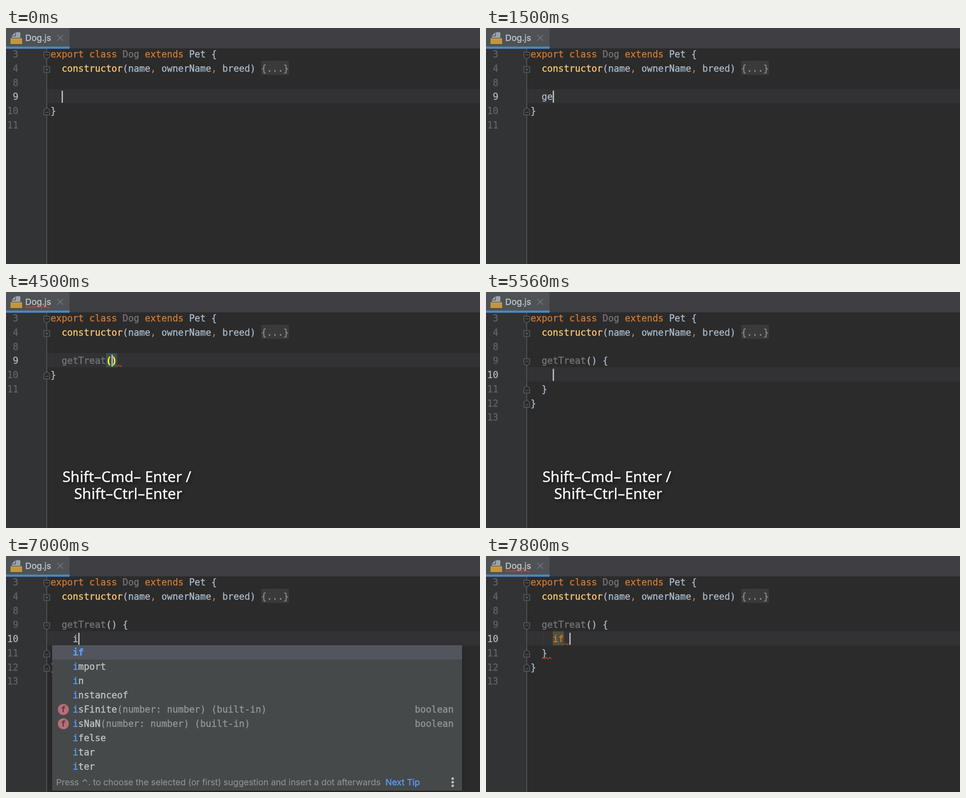
An HTML page with a canvas for the animation above (8 s loop, 1058x529 px).

```html
<!DOCTYPE html>
<html lang="en">
<head>
<meta charset="utf-8">
<title>Code editor</title>
<style>
  html, body { margin: 0; width: 100%; height: 100%; overflow: hidden; background: #2b2b2b; }
  canvas { display: block; }
</style>
</head>
<body>
<canvas id="stage" width="1058" height="529"></canvas>
<script>
const ctx = document.getElementById('stage').getContext('2d');
const W = 1058, H = 529, LOOP = 8000;
const LEFT = 99.5, PITCH = 12.37, LINE = 31.75;
const MONO = '20.55px "DejaVu Sans Mono", monospace';
const UI = '19.25px Inter, sans-serif';
const C = {
  text: '#a9b7c6', key: '#cc7832', fn: '#ffc66d', dim: '#737577', back: '#2b2b2b',
  gutter: '#313335', line: '#323234', rule: '#606264', error: '#c7423e', link: '#589df6'
};

const colX = col => LEFT + col * PITCH;
const baseY = row => 66.2 + row * LINE;
const topY = row => 41.75 + row * LINE;

function rect(x, y, w, h, color) {
  ctx.fillStyle = color;
  ctx.fillRect(x, y, w, h);
}

// A thin outline gives the letters a slightly heavier stem.
function text(str, x, y, color, font = MONO, align = 'left', outline = 0.45) {
  ctx.font = font;
  ctx.textAlign = align;
  ctx.fillStyle = ctx.strokeStyle = color;
  ctx.lineWidth = outline;
  ctx.fillText(str, x, y);
  ctx.strokeText(str, x, y);
}

function path(points, close) {
  ctx.beginPath();
  points.forEach(([x, y]) => ctx.lineTo(x, y));
  if (close) ctx.closePath();
}

function stroke(points, color, width, close) {
  path(points, close);
  ctx.strokeStyle = color;
  ctx.lineWidth = width;
  ctx.stroke();
}

function dot(x, y, r, color) {
  ctx.beginPath();
  ctx.arc(x, y, r, 0, Math.PI * 2);
  ctx.fillStyle = color;
  ctx.fill();
}

// Parts alternate text and color, laid out on the character grid.
function runs(x, y, ...parts) {
  for (let i = 0; i < parts.length; i += 2) {
    text(parts[i], x, y, parts[i + 1]);
    x += parts[i].length * PITCH;
  }
}

const code = (row, col, ...parts) => runs(colX(col), baseY(row), ...parts);

function mark(row, col, count, color) {
  rect(colX(col), topY(row), count * PITCH, LINE, color);
}

function squiggle(x1, x2, y) {
  const points = [];
  for (let x = x1, up = false; x <= x2; x += 3.7, up = !up) points.push([x, y + (up ? -2 : 2)]);
  stroke(points, C.error, 1.3);
}

function errorAt(row, col, width) {
  squiggle(colX(col), colX(col) + width, baseY(row) + 4);
}

function caret(row, col) {
  rect(colX(col), baseY(row) - 21, 2.7, 27, '#c8c8c8');
}

function fold(row, kind) {
  const l = 84.5, r = 97.5, m = 91, y = topY(row);
  const shapes = {
    open: [[l, y + 12.5], [r, y + 12.5], [r, y + 23], [m, y + 28.5], [l, y + 23]],
    end: [[l, y + 26], [r, y + 26], [r, y + 15.5], [m, y + 9.5], [l, y + 15.5]],
    plus: [[l, y + 13], [r, y + 13], [r, y + 26], [l, y + 26]]
  };
  const mid = y + (kind === 'open' ? 18.5 : kind === 'end' ? 20.5 : 19.5);
  path(shapes[kind], true);
  ctx.fillStyle = C.back;
  ctx.fill();
  stroke(shapes[kind], C.rule, 1.4, true);
  stroke([[87.5, mid], [94.5, mid]], C.rule, 1.4);
  if (kind === 'plus') stroke([[m, mid - 3.5], [m, mid + 3.5]], C.rule, 1.4);
}

function tab(hasError) {
  rect(0, 0, W, 45.5, '#3f3f43');
  rect(0, 0, 142, 41.5, '#4e5254');
  rect(0, 41.5, 142, 5, '#4a88c7');
  path([[13, 17], [20.5, 9.5], [20.5, 17]], true);
  ctx.fillStyle = '#9aa4ab';
  ctx.fill();
  path([[22, 9.5], [32, 9.5], [32, 22], [13, 22], [13, 18.5], [22, 18.5]], true);
  ctx.fill();
  rect(10, 23, 26, 13, '#c0973f');
  text('Dog.js', 43, 29, '#c3c5c7', UI);
  stroke([[114.5, 15.5], [127.5, 28.5]], '#797d80', 1.5);
  stroke([[127.5, 15.5], [114.5, 28.5]], '#797d80', 1.5);
  if (hasError) squiggle(43, 101.5, 34);
}

// Each item is [icon, right-hand type, ...colored parts].
function popup(x, y, w, textX, items) {
  const row = 32, h = items.length * row + 38;
  ctx.save();
  ctx.shadowColor = 'rgba(0,0,0,.22)';
  ctx.shadowBlur = 12;
  ctx.shadowOffsetY = 5;
  rect(x, y, w, h, '#46494a');
  ctx.restore();
  rect(x, y, w, row, '#52555d');
  items.forEach(([icon, type, ...parts], i) => {
    const base = y + i * row + 23;
    if (icon) {
      dot(x + 25, base - 7, 12.2, '#b76e78');
      text('f', x + 25, base - 1, '#44343a', '18px "DejaVu Sans Mono", monospace', 'center');
    }
    if (parts.length === 2 && i === 0) {
      text(parts[0], textX, base, parts[1], 'bold ' + MONO);
    } else {
      runs(textX, base, ...parts);
    }
    if (type) text(type, x + w - 19, base, '#939596', MONO, 'right');
  });
  const base = y + h - 12;
  text('Press ⌃. to choose the selected (or first) suggestion and insert a dot afterwards',
    x + 9, base, '#8f9193', UI, 'left', 0.2);
  text('Next Tip', x + 744, base, C.link, UI);
  [-8, 0, 8].forEach(d => dot(x + w - 21, y + h - 19 + d, 2.8, '#bfc1c2'));
}

function callItem(first, rest, args, type) {
  return [true, type, first, C.link, rest, '#c0c2c4', args, '#939596'];
}

const ifItem = [false, '', 'if', C.link];
const finiteItem = [true, 'boolean', 'i', C.link, 's', '#c0c2c4', 'F', C.link, 'inite', '#c0c2c4',
  '(number: number) (built-in)', '#939596'];

function caption() {
  const font = '33px "Noto Sans", sans-serif';
  ctx.save();
  ctx.shadowColor = 'rgba(0,0,0,.4)';
  ctx.shadowBlur = 6;
  ctx.shadowOffsetX = ctx.shadowOffsetY = 3;
  text('Shift–Cmd– Enter /', 126, 426, '#fff', font);
  text('Shift–Ctrl–Enter', 152, 464, '#fff', font);
  ctx.restore();
}

function bulb() {
  dot(123.5, 119, 8, '#edb34c');
  rect(119.5, 125, 8, 3, '#edb34c');
  rect(119.5, 129.5, 8, 2, '#9aa4ab');
  rect(121, 133, 5, 1.5, '#9aa4ab');
}

// Start time of each typed length of the method name.
const keys = [[1330, 'g'], [1500, 'ge'], [1630, 'get'], [2000, 'getT'], [2300, 'getTr'],
  [2400, 'getTre'], [2560, 'getTrea'], [2830, 'getTreat']];

const typedAt = t => keys.reduce((word, [start, next]) => t >= start ? next : word, '');
const between = (t, a, b) => t >= a && t < b;

function methodLine(t) {
  const word = typedAt(t);
  const parens = t >= 3730;
  const dimCount = t < 2100 ? 0 : t < 2500 ? 3 : t < 3200 ? 6 : 8;
  if (between(t, 3230, 4030)) mark(3, 2, 8, '#344134');
  const fresh = word === 'get' ? C.key : C.text;
  code(3, 2, word.slice(0, dimCount), C.dim, word.slice(dimCount), fresh);
  if (parens) {
    mark(3, 10, 2, '#3b514d');
    text('(', colX(10), baseY(3), '#ffef28', 'bold ' + MONO);
    text(')', colX(11), baseY(3), '#ffef28', 'bold ' + MONO);
    if (t >= 4100) errorAt(3, 12, 11.5);
  }
  if (!between(t, 800, 1300) && t < 4800) caret(3, 2 + word.length + parens);
  if (between(t, 1430, 1470)) {
    popup(88, 169, 943, colX(2), [
      [false, '', 'get', C.link],
      [false, '', 'g', C.link, 'et name() {...}', '#c0c2c4']
    ]);
  }
}

function methodBlock(t) {
  code(3, 2, 'getTreat', C.dim, '() {', C.text);
  code(5, 2, '}', C.text);
  if (t < 5530) errorAt(3, 14, 11.5);
  if (t >= 7760) {
    mark(4, 4, 2, '#52503a');
    rect(128, topY(4), 1, LINE, '#3b3b3b');
    errorAt(4, 6, 12.5);
    errorAt(5, 2, 23);
  }
  const word = t < 6860 ? '' : t < 7030 ? 'i' : t < 7430 ? 'if' : 'if ';
  code(4, 4, word, word.length > 1 ? C.key : C.text);
  if (!between(t, 6330, 6830)) caret(4, 4 + word.length);
}

function suggestions(t) {
  if (between(t, 7000, 7030)) {
    popup(103, 200, 915, colX(4), [
      ifItem,
      [false, '', 'i', C.link, 'mport', '#c0c2c4'],
      [false, '', 'i', C.link, 'n', '#c0c2c4'],
      [false, '', 'i', C.link, 'nstanceof', '#c0c2c4'],
      callItem('i', 'sFinite', '(number: number) (built-in)', 'boolean'),
      callItem('i', 'sNaN', '(number: number) (built-in)', 'boolean'),
      [false, '', 'i', C.link, 'felse', '#c0c2c4'],
      [false, '', 'i', C.link, 'tar', '#c0c2c4'],
      [false, '', 'i', C.link, 'ter', '#c0c2c4']
    ]);
  } else if (between(t, 7030, 7430)) {
    popup(103, 200, 915, colX(4), [ifItem, finiteItem]);
  }
}

function draw(t) {
  const expanded = t >= 5200;
  const active = expanded ? 4 : 3;
  const lastRow = expanded ? 6 : 4;

  rect(0, 0, W, H, C.back);
  rect(0, 45, 90, H, C.gutter);
  rect(91, topY(active), W, LINE, C.line);
  rect(90, 45, 1.6, H, '#595b5c');

  const numbers = expanded ? [3, 4, 8, 9, 10, 11, 12, 13] : [3, 4, 8, 9, 10, 11];
  numbers.forEach((n, row) =>
    text(n, 27.5, baseY(row), row === active ? '#b2b2b2' : '#606366', MONO, 'right'));

  fold(0, 'open');
  fold(1, 'plus');
  fold(lastRow, 'end');
  if (t >= 5500) {
    fold(3, 'open');
    fold(5, 'end');
  }

  code(0, 0, 'export class ', C.key, 'Dog ', C.dim, 'extends ', C.key, 'Pet {', C.text);
  code(1, 2, 'constructor', C.fn, '(name', C.text, ', ', C.key, 'ownerName', C.text,
    ', ', C.key, 'breed)', C.text);
  mark(1, 38, 5, '#3a3a3a');
  code(1, 38, '{...}', '#8a8c8c');
  code(lastRow, 0, '}', C.text);

  if (expanded) methodBlock(t); else methodLine(t);
  if (between(t, 4530, 5200)) bulb();
  if (between(t, 4500, 6330)) caption();
  suggestions(t);
  tab(between(t, 4130, 5500) || t >= 7800);
}

const start = performance.now();
function frame() {
  draw((performance.now() - start) % LOOP);
  requestAnimationFrame(frame);
}
frame();
</script>
</body>
</html>
```
